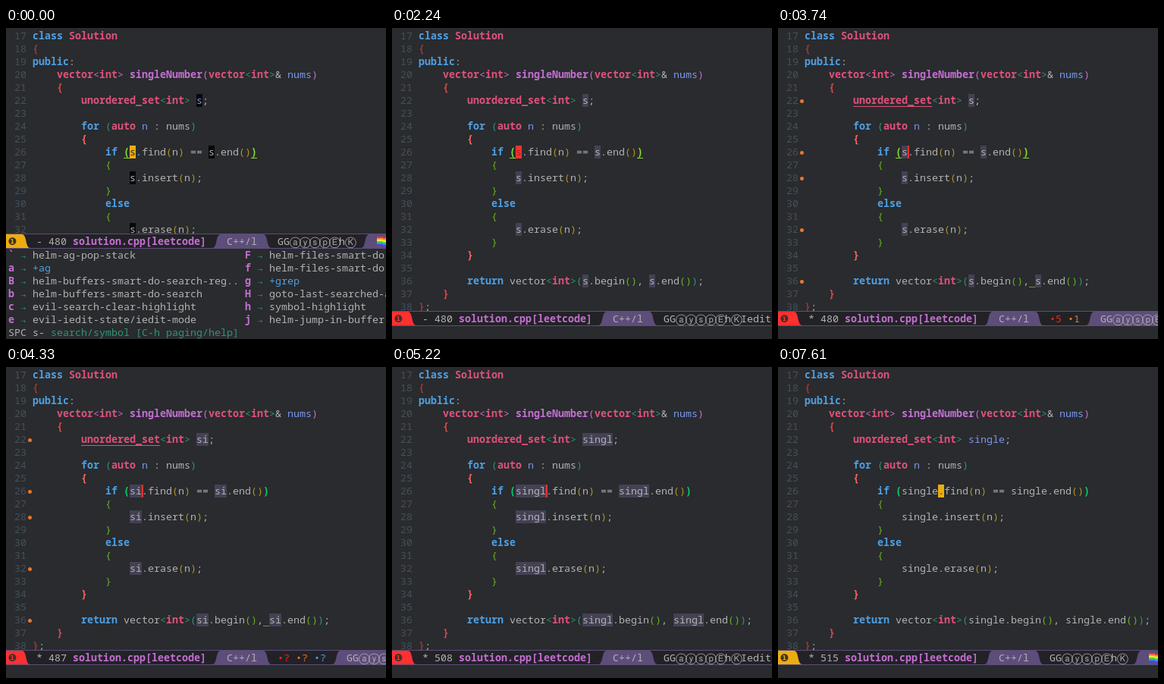
An HTML page with a canvas for the animation above (8960 ms loop, 501 by 410 pixels).

```html
<!DOCTYPE html>
<html lang="en">
<head>
<meta charset="utf-8">
<title>Renaming a symbol with iedit</title>
<style>
  html, body { margin: 0; height: 100%; overflow: hidden; background: #292b2e; }
  canvas { display: block; }
</style>
</head>
<body>
<canvas id="stage" width="501" height="410"></canvas>
<script>
const ctx = document.getElementById('stage').getContext('2d');
const W = 501, H = 410, CHAR = 8, ROW = 17, LEFT = 35, TOP = 2, LOOP = 8960;
const MONO = '"Noto Sans Mono", "DejaVu Sans Mono", monospace';
const BG = '#292b2e', BAR = '#222226', PURPLE = '#5d4d7a', TEXT = '#b2b2b2';
const YELLOW = '#eead0e', RED = '#ff3030', ORANGE = '#e8762d', BLUE = '#4f9fe3';
const PINK = '#e0517b', MAGENTA = '#c56fd3', TEAL = '#2d9574', GREEN = '#67b11d';

// Style letters used after "~" in the markup: [colour, bold]
const styles = {
  d: [TEXT], k: [BLUE, 1], b: [BLUE], t: [PINK, 1], e: [PINK, 1], f: [MAGENTA, 1], v: ['#7b97ea'],
  2: [MAGENTA], 3: [TEAL], 4: [GREEN], 5: ['#b1951d'], w: [TEXT],
  x: ['#93373a', 1], y: ['#d84848', 1], z: ['#ff625e', 1]
};

// "@" stands for the symbol being renamed, "~m" for the matched parenthesis
const code = [
  '~kclass ~tSolution',
  '~x{',
  '~kpublic~d:',
  '    ~tvector~2<~tint~2> ~fsingleNumber~2(~tvector~3<~tint~3>~d& ~vnums~2)',
  '    ~y{',
  '        ~eunordered_set~3<~tint~3> ~v@~d;',
  '',
  '        ~kfor ~3(~tauto ~vn ~d: nums~3)',
  '        ~z{',
  '            ~kif ~m(~d@.find~5(~dn~5)~d == @.end~5()~m)',
  '            ~4{',
  '                ~d@.insert~5(~dn~5)~d;',
  '            ~4}',
  '            ~kelse',
  '            ~4{',
  '                ~d@.erase~5(~dn~5)~d;',
  '            ~4}',
  '        ~z}',
  '',
  '        ~kreturn ~dvector~3<~tint~3>(~d@.begin~4()~d,~w ~d@.end~4()~3)~d;',
  '    ~y}',
  '~x}~d;'
];
const flaggedRows = [5, 9, 11, 15, 19];

const menu = [
  ['`', 'helm-ag-pop-stack', 'F', 'helm-files-smart-do-search-reg..'],
  ['a', '+ag', 'f', 'helm-files-smart-do-search'],
  ['B', 'helm-buffers-smart-do-search-reg..', 'g', '+grep'],
  ['b', 'helm-buffers-smart-do-search', 'H', 'goto-last-searched-ahs-symbol'],
  ['c', 'evil-search-clear-highlight', 'h', 'symbol-highlight'],
  ['e', 'evil-iedit-state/iedit-mode', 'j', 'helm-jump-in-buffer']
];

// Each step changes only the listed parts of the state
const steps = [
  [0, { name: 's', mode: 'normal', cursor: 'block', at: 0, menu: true, message: '', check: '',
        errors: false, match: true, edited: false }],
  [900, { mode: 'iedit', menu: false, message: '7 matches for "\\_<s\\_>"' }],
  [2240, { message: '' }],
  [2390, { name: '', edited: true }],
  [2690, { cursor: 'bar' }],
  [2840, { check: '???' }],
  [3740, { name: 's', at: 1, check: '51', errors: true }],
  [3890, { match: false }],
  [4180, { check: '???' }],
  [4330, { name: 'si', at: 2 }],
  [4770, { name: 'sin', at: 3 }],
  [4920, { name: 'sing', at: 4 }],
  [5220, { name: 'singl', at: 5, check: '', errors: false }],
  [5520, { name: 'single', at: 6 }],
  [6270, { check: '???' }],
  [6720, { check: '' }],
  [7160, { cursor: 'block' }],
  [7610, { mode: 'normal' }]
];

const stateAt = t => Object.assign({}, ...steps.filter(s => s[0] <= t).map(s => s[1]));

function rect(x, y, w, h, color) {
  ctx.fillStyle = color;
  ctx.fillRect(x, y, w, h);
}

// Draws monospaced text and returns the x where it ends
function text(str, x, y, color = TEXT, bold = false) {
  ctx.font = `${bold ? 'bold ' : ''}13.3333px ${MONO}`;
  ctx.fillStyle = color;
  ctx.fillText(str, x, y);
  return x + str.length * CHAR;
}

function drawLine(line, row, s) {
  const top = TOP + row * ROW, normal = s.mode === 'normal';
  let x = LEFT, style = 'd';
  for (const [part, letter] of line.matchAll(/~(.)|@|[^~@]+/g)) {
    if (letter) { style = letter; continue; }
    const isName = part === '@', str = isName ? s.name : part, width = str.length * CHAR;
    let [color, bold] = style === 'm' ? [s.match ? '#86dc2f' : '#00d26a', 1] : styles[style];
    if (isName) {
      if (!normal) color = TEXT;
      if (!normal || s.menu) rect(x, top, width, ROW, normal ? '#08080a' : '#444155');
    }
    text(str, x, top + 13, color, bold);
    const underlined = style === 'm' ? s.match : s.errors && 'ew'.includes(style);
    if (underlined) rect(x, top + 16, width, 1, style === 'w' ? '#7f8a4a' : color);
    x += width;
  }
}

function drawCursor(s, accent) {
  const x = LEFT + (16 + s.at) * CHAR, top = TOP + 9 * ROW;
  if (s.cursor === 'bar') return rect(x, top, 2, ROW, accent);
  rect(x, top, CHAR, ROW, accent);
  const under = (s.name + '.')[s.at];
  text(under, x, top + 13, s.mode === 'normal' ? BG : '#8a2a30');
}

// Fills a mode line segment whose ends curve outwards at the bottom
function segment(textStart, textEnd, top, color) {
  const l = textStart - 19, r = textEnd + 8, b = top + 18, m = top + 9;
  ctx.fillStyle = color;
  ctx.beginPath();
  ctx.moveTo(l + 11, top);
  ctx.bezierCurveTo(l + 4, top, l + 7, b, l, b);
  ctx.lineTo(r + 11, b);
  ctx.bezierCurveTo(r + 4, b, r + 7, top, r, top);
  ctx.fill();
}

function minorModes(x, y) {
  for (const ch of 'GGⓐⓨⓢⓟⒺhⓀ') {
    if (ch < '\u2000') { x = text(ch, x, y); continue; }
    ctx.font = '14.5px "DejaVu Sans", sans-serif';
    ctx.fillStyle = TEXT;
    ctx.fillText(ch, x, y);
    x += 13;
  }
  return x;
}

function rainbow(x, top) {
  ['#f33', '#f93', '#fe3', '#4d3', '#29f', '#63f'].forEach((color, i) => {
    rect(x, top + 3 + i * 2, 8, 2, color);
    rect(x + 8, top + 4 + i * 2, 8, 2, color);
  });
}

function drawModeLine(s, y, accent) {
  const top = y + 1, base = y + 15, gap = 27;
  rect(0, y, W, 20, PURPLE);
  rect(0, top, W, 18, BAR);

  segment(-20, 13, top, accent);
  ctx.font = '13px "DejaVu Sans", sans-serif';
  ctx.fillStyle = '#3e3128';
  ctx.fillText('❶', 2.5, base);

  text(s.edited ? '*' : '-', 40, base);
  text(String(473 + 7 * s.name.length), 56, base);
  text('solution.cpp[leetcode]', 88, base, MAGENTA, true);
  segment(291, 331, top, PURPLE);
  text('C++/l', 291, base);

  let x = 358;
  if (s.check) {
    [...s.check].forEach((count, i) => {
      text('•' + count, x + i * 24, base, ['#f2241f', ORANGE, BLUE][i]);
    });
    x += s.check.length * 24 - 8 + gap;
    segment(x, W + 30, top, PURPLE);
  }
  const end = minorModes(x, base);
  if (s.mode === 'iedit') text('Iedit', end, base);
  else {
    segment(end + gap, W + 30, top, PURPLE);
    rainbow(end + gap + 2, top);
  }
}

function drawMenu(y) {
  menu.forEach((entry, row) => {
    const base = y + row * ROW + 13;
    [3, 315].forEach((x, col) => {
      const [key, label] = entry.slice(col * 2);
      text(key, x, base, MAGENTA, true);
      text('→', x + 16, base, TEAL);
      text(label, x + 32, base, label[0] === '+' ? BLUE : TEXT);
    });
  });
  const x = text('SPC s- ', 3, 406);
  text('search/symbol [C-h paging/help]', x, 406, TEAL);
}

function draw(t) {
  const s = stateAt(t), accent = s.mode === 'normal' ? YELLOW : RED;
  const modeLineY = s.menu ? 271 : 373;
  rect(0, 0, W, H, BG);
  code.forEach((line, row) => {
    text(String(17 + row), 11, TOP + row * ROW + 13, '#44505c');
    drawLine(line, row, s);
  });
  if (s.errors) for (const row of flaggedRows) {
    ctx.fillStyle = ORANGE;
    ctx.beginPath();
    ctx.arc(31.5, TOP + row * ROW + 9.5, 2.5, 0, 7);
    ctx.fill();
  }
  drawCursor(s, accent);
  rect(0, modeLineY, W, H - modeLineY, BG);
  drawModeLine(s, modeLineY, accent);
  if (s.menu) drawMenu(modeLineY + 20);
  text(s.message, 3, 406);
}

const start = performance.now();
function tick() {
  draw((performance.now() - start) % LOOP);
  requestAnimationFrame(tick);
}
tick();
</script>
</body>
</html>
```
